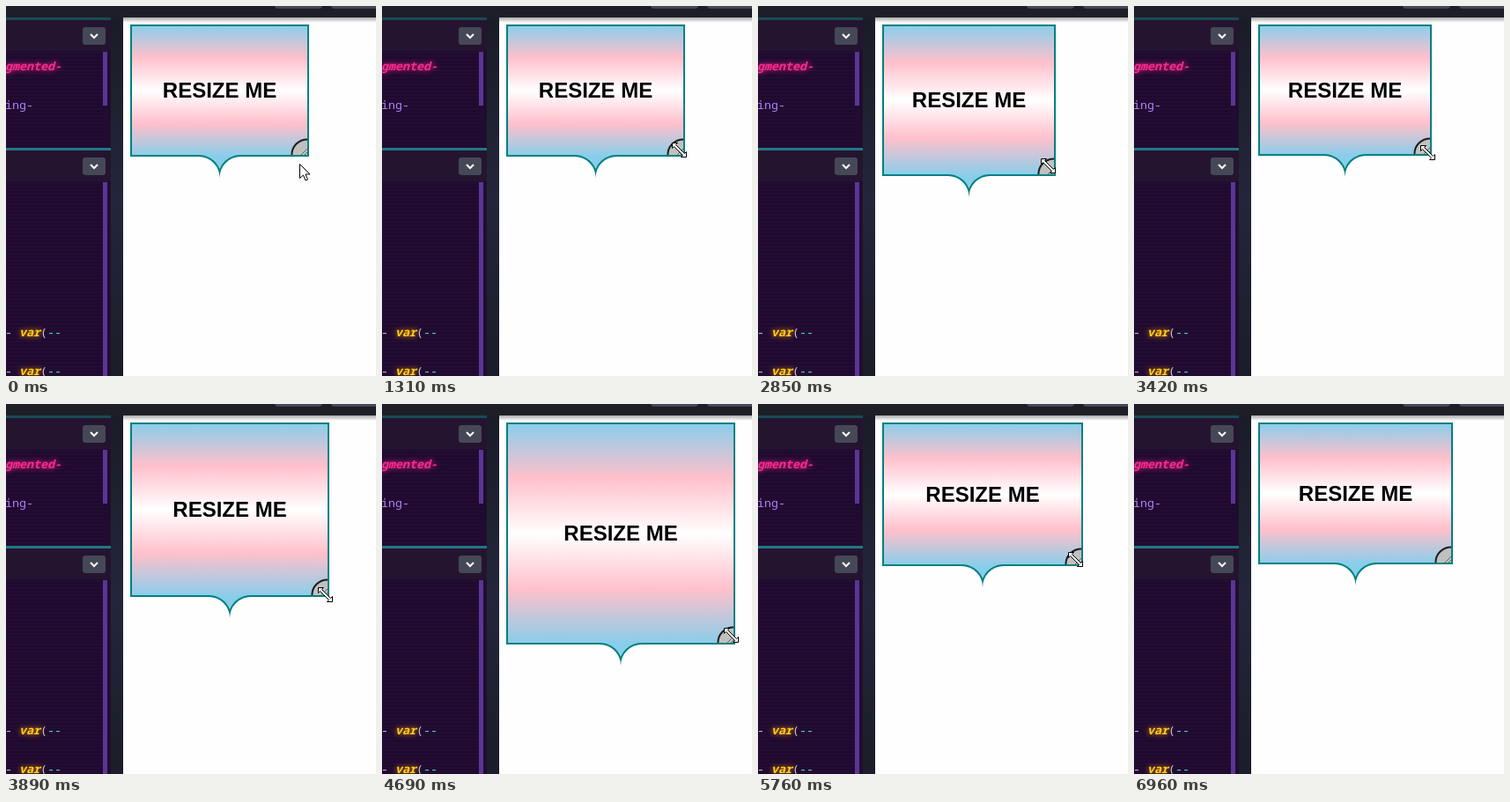
Animation, 420 px wide and 420 px high, one loop 7.61 s. Source, as an HTML page:

```html
<!DOCTYPE html>
<html lang="en">
<head>
<meta charset="utf-8">
<title>Resize me</title>
<style>
  html, body { margin: 0; width: 100%; height: 100%; overflow: hidden; background: #fefefe; }
  #stage { position: relative; width: 420px; height: 420px; overflow: hidden; }
  #stage > * { position: absolute; }
  .bar { left: 0; top: 0; width: 420px; height: 13px; background: #1e1f26; }
  .bar i { position: absolute; top: -10px; width: 54px; height: 13px; border-radius: 4px; background: #444857; }
  .shade { left: 133px; top: 13px; width: 287px; height: 6px; background: linear-gradient(#a9a9ac, #fefefe); }
  .gutter { left: 119px; top: 13px; width: 14px; height: 407px; background: linear-gradient(#1a1c28, #23263a 50%, #1b1d2a); }
  .panel { left: 0; width: 119px; background: #1f0e2b; }
  .panel::before { content: ""; position: absolute; left: 0; top: 0; width: 119px; height: 3px; background: var(--line); }
  .head { position: absolute; top: 3px; width: 119px; height: 35px; background: #251430; }
  .head svg { position: absolute; left: 87px; top: 8px; }
  .code { position: absolute; top: 39px; bottom: 0; width: 115px;
    background: repeating-linear-gradient(#240c35 0 2px, #1f0a2d 2px 4px); }
  .thumb { position: absolute; right: 0; top: 0; width: 5px; background: #5b3597; }
  .text { left: -1px; font: 13.33px/20px "Noto Sans Mono", monospace; white-space: pre; color: #c9c5d0; }
  .text b { font-style: italic; }
  .hot { color: #ff2a8e; text-shadow: 0 0 6px #ff2a8e; }
  .fn { color: #ffd012; text-shadow: 0 0 6px #f90; }
  .prop { color: #4fdcc6; }
  .value { color: #b181f5; }
  #view { left: 0; top: 0; }
  #label { font: bold 24px "Liberation Sans", Arial, sans-serif; text-anchor: middle; }
</style>
</head>
<body>
<div id="stage">
  <div class="gutter"></div>
  <div class="panel" style="top:13px;height:148px;--line:#174a57">
    <div class="head"><svg width="26" height="20"><rect width="26" height="20" rx="3" fill="#444857"/><path d="M9 8l4 4 4-4" fill="none" stroke="#fff" stroke-width="2"/></svg></div>
    <div class="code"><div class="thumb" style="height:61px"></div></div>
  </div>
  <div class="panel" style="top:161px;height:259px;--line:#1f7884">
    <div class="head"><svg width="26" height="20"><rect width="26" height="20" rx="3" fill="#444857"/><path d="M9 8l4 4 4-4" fill="none" stroke="#fff" stroke-width="2"/></svg></div>
    <div class="code"><div class="thumb" style="height:100%"></div></div>
  </div>
  <div class="text" style="top:58px"><b class="hot">gmented-</b></div>
  <div class="text value" style="top:102px">ing-</div>
  <div class="text" style="top:360px">- <b class="fn">var</b>(<span class="prop">--</span></div>
  <div class="text" style="top:404px">- <b class="fn">var</b>(<span class="prop">--</span></div>
  <div class="shade"></div>
  <div class="bar"><i style="left:305px"></i><i style="left:369px;width:60px"></i></div>
  <svg id="view" width="420" height="420">
    <defs>
      <linearGradient id="flag" gradientUnits="userSpaceOnUse" x1="0" y1="21" x2="0" y2="171">
        <stop offset="0" stop-color="#87ceeb"/>
        <stop offset=".25" stop-color="#ffc0cb"/>
        <stop offset=".5" stop-color="#fff"/>
        <stop offset=".75" stop-color="#ffc0cb"/>
        <stop offset="1" stop-color="#87ceeb"/>
      </linearGradient>
    </defs>
    <path id="edge" fill="#008080"/>
    <path id="fill" fill="url(#flag)"/>
    <g id="grip">
      <path d="M0 0H-18A18 18 0 0 1 0 -18Z" fill="#c0c0c0"/>
      <path d="M-17.6 0A17.6 17.6 0 0 1 0 -17.6" fill="none" stroke="#1c1c1c" stroke-width="2"/>
      <path d="M-7 0L0 -7M-3 0L0 -3" stroke="#666"/>
    </g>
    <text id="label">RESIZE ME</text>
    <g fill="#fff" stroke="#000">
      <path id="arrow" d="M0 0V16L4 12.5L6.5 18.5L9 17.5L6.5 11.5H11.5Z"/>
      <path id="sizer" d="M-8 -8H-2L-4 -6L6 4L8 2V8H2L4 6L-6 -4L-8 -2Z"/>
    </g>
  </svg>
</div>
<script>
  const LOOP = 7610, LAG = 40, DRAG_START = 1270, DRAG_END = 5950;
  const LEFT = 141, TOP = 21, GRIP_X = 6.5, GRIP_Y = 7.5;
  const $ = id => document.getElementById(id);

  // Corner of the box while it is dragged: time, x, y
  const corner = [
    [1310, 344, 171], [1910, 388, 216], [2060, 398, 229], [2200, 410, 236],
    [2850, 338, 193], [3060, 331, 170], [3260, 334, 162], [3630, 347, 192],
    [3890, 367, 219], [4420, 386, 285], [4690, 401, 273], [4760, 404, 268],
    [5220, 401, 212], [5760, 369, 184], [5950, 362, 183], [5990, 362, 182]
  ];
  // Pointer over the whole loop; the box follows it with a short lag
  const pointer = [
    [370, 333, 179], [970, 337.5, 163.5],
    ...corner.map(([t, x, y]) => [t - LAG, x - GRIP_X, y - GRIP_Y]),
    [6260, 355.5, 174.5], [6620, 380, 350], [6810, 380, 350], [6955, 397, 422]
  ];

  const slope = (i, k) => {
    const a = pointer[i], b = pointer[i + 1];
    return a && b ? (b[k] - a[k]) / (b[0] - a[0]) : 0;
  };
  // Monotone tangent: flat at turning points
  const tangent = (i, k) => {
    const p = slope(i - 1, k), q = slope(i, k);
    return p * q > 0 ? 2 * p * q / (p + q) : 0;
  };

  function pointerAt(t) {
    const last = pointer.length - 1;
    t = Math.min(Math.max(t, pointer[0][0]), pointer[last][0]);
    let i = 0;
    while (i < last - 1 && t > pointer[i + 1][0]) i++;
    const a = pointer[i], b = pointer[i + 1], d = b[0] - a[0], u = (t - a[0]) / d;
    return [1, 2].map(k =>
      a[k] + (b[k] - a[k]) * u * u * (3 - 2 * u) +
      d * u * (1 - u) * (tangent(i, k) * (1 - u) - tangent(i + 1, k) * u));
  }

  // Box outline with a scooped tail, inset by n
  function outline(r, b, n) {
    const c = (LEFT + r) / 2, R = 24 + n;
    const tip = b + 24 - Math.sqrt(R * R - 24 * 24);
    return `M${LEFT + n} ${TOP + n}H${r - n}V${b - n}H${c + 24}` +
      `A${R} ${R} 0 0 0 ${c} ${tip}A${R} ${R} 0 0 0 ${c - 24} ${b - n}H${LEFT + n}Z`;
  }

  const move = (el, x, y) => el.setAttribute("transform", `translate(${x} ${y})`);

  function draw(now) {
    const t = now % LOOP;
    const [bx, by] = pointerAt(Math.min(Math.max(t - LAG, DRAG_START), DRAG_END));
    const r = Math.round(bx + GRIP_X), b = Math.round(by + GRIP_Y);
    $("edge").setAttribute("d", outline(r, b, 0));
    $("fill").setAttribute("d", outline(r, b, 2));
    $("flag").setAttribute("y2", b);
    move($("grip"), r - 2, b - 2);
    move($("label"), (LEFT + r) / 2, Math.round((TOP + b) / 2 + 8));

    const [x, y] = pointerAt(t);
    const dragging = t >= DRAG_START && t <= DRAG_END;
    const sizing = dragging || y < b - 1;
    const px = Math.floor(x) + .5, py = Math.floor(y) + .5;
    move($("sizer"), px, py);
    move($("arrow"), px, py);
    $("sizer").style.display = sizing ? "" : "none";
    $("arrow").style.display = sizing ? "none" : "";
    requestAnimationFrame(tick);
  }

  let start;
  function tick(now) {
    start ??= now;
    draw(now - start);
  }
  requestAnimationFrame(tick);
</script>
</body>
</html>
```
